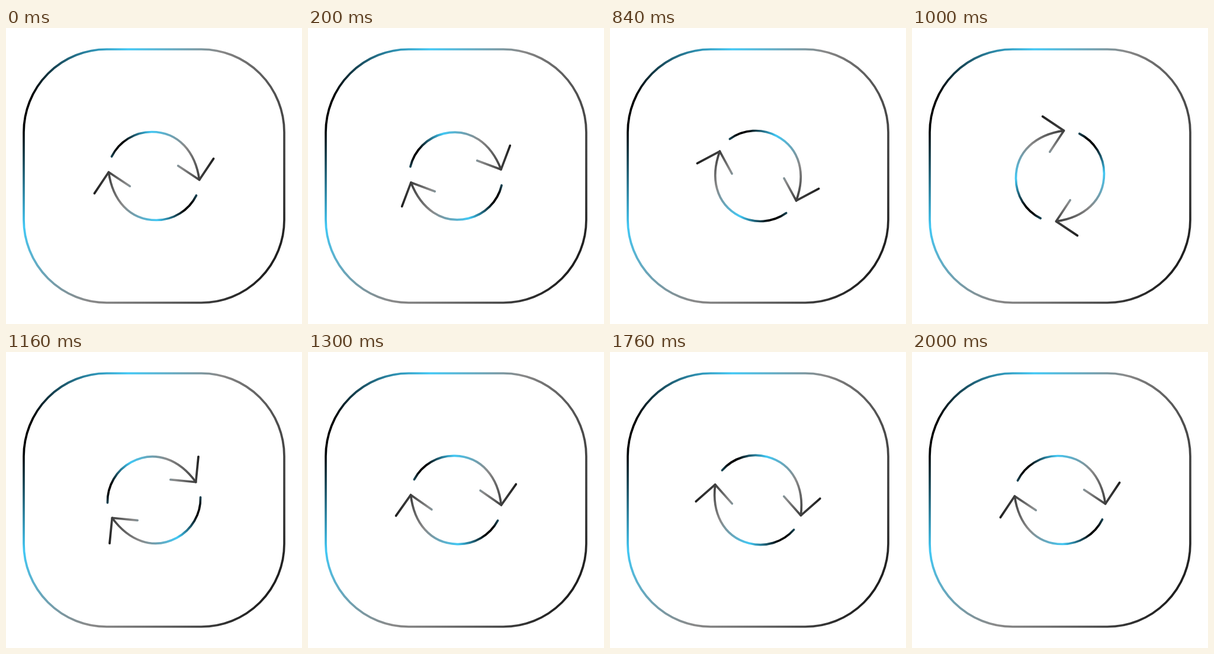
Animation, 500 px wide and 500 px high, one loop 2020 ms. Source, as an HTML page:

```html
<!DOCTYPE html>
<html>
<head>
<meta charset="utf-8">
<style>
  html, body { margin: 0; width: 100%; height: 100%; overflow: hidden; background: #fff; }
  svg { display: block; width: 100vw; height: 100vh; }
</style>
</head>
<body>
<svg viewBox="0 0 500 500" fill="none" stroke-width="3.7" stroke-linecap="round" stroke-linejoin="round">
  <defs>
    <radialGradient id="frameInk" gradientUnits="userSpaceOnUse" cx="40" cy="140" r="510">
      <stop offset="0.05" stop-color="#000"/>
      <stop offset="0.385" stop-color="#41c8f5"/>
      <stop offset="0.66" stop-color="#8a8a8a"/>
      <stop offset="1" stop-color="#0c0c0c"/>
    </radialGradient>
    <radialGradient id="arrowInk" gradientUnits="userSpaceOnUse" cx="194" cy="199" r="160">
      <stop offset="0.05" stop-color="#000"/>
      <stop offset="0.35" stop-color="#41c8f5"/>
      <stop offset="0.68" stop-color="#8a8a8a"/>
      <stop offset="1" stop-color="#1c1c1c"/>
    </radialGradient>
  </defs>
  <rect x="30" y="36" width="440" height="428" rx="140" stroke="url(#frameInk)"/>
  <g id="spinner">
    <g id="arrow" stroke="url(#arrowInk)">
      <path d="M178.5 217.2A75.5 75.5 0 0 1 246 175.5C292 175.5 320 210 326.6 256.5"/>
      <path d="M290.7 232.8L326.6 256.5L350.6 220.6"/>
    </g>
    <use href="#arrow" transform="rotate(180 250 250)"/>
  </g>
</svg>
<script>
const LOOP = 2020, STEP = 20, TURN = 2000;
const spinner = document.getElementById('spinner');

// One coordinate of a cubic Bezier running from 0 to 1
const bezier = (a, b, s) => 3 * (1 - s) ** 2 * s * a + 3 * (1 - s) * s * s * b + s ** 3;

// Ease in and out with overshoot: cubic-bezier(.68, -.6, .32, 1.6)
function ease(x) {
  if (x <= 0 || x >= 1) return x <= 0 ? 0 : 1;
  let lo = 0, hi = 1;
  for (let i = 0; i < 30; i++) {
    const mid = (lo + hi) / 2;
    if (bezier(0.68, 0.32, mid) < x) lo = mid; else hi = mid;
  }
  return bezier(-0.6, 1.6, lo);
}

const start = performance.now();
function draw() {
  const t = Math.floor((performance.now() - start) % LOOP / STEP) * STEP;
  spinner.setAttribute('transform', `rotate(${180 * ease(t / TURN)} 250 250)`);
  requestAnimationFrame(draw);
}
draw();
</script>
</body>
</html>
```
